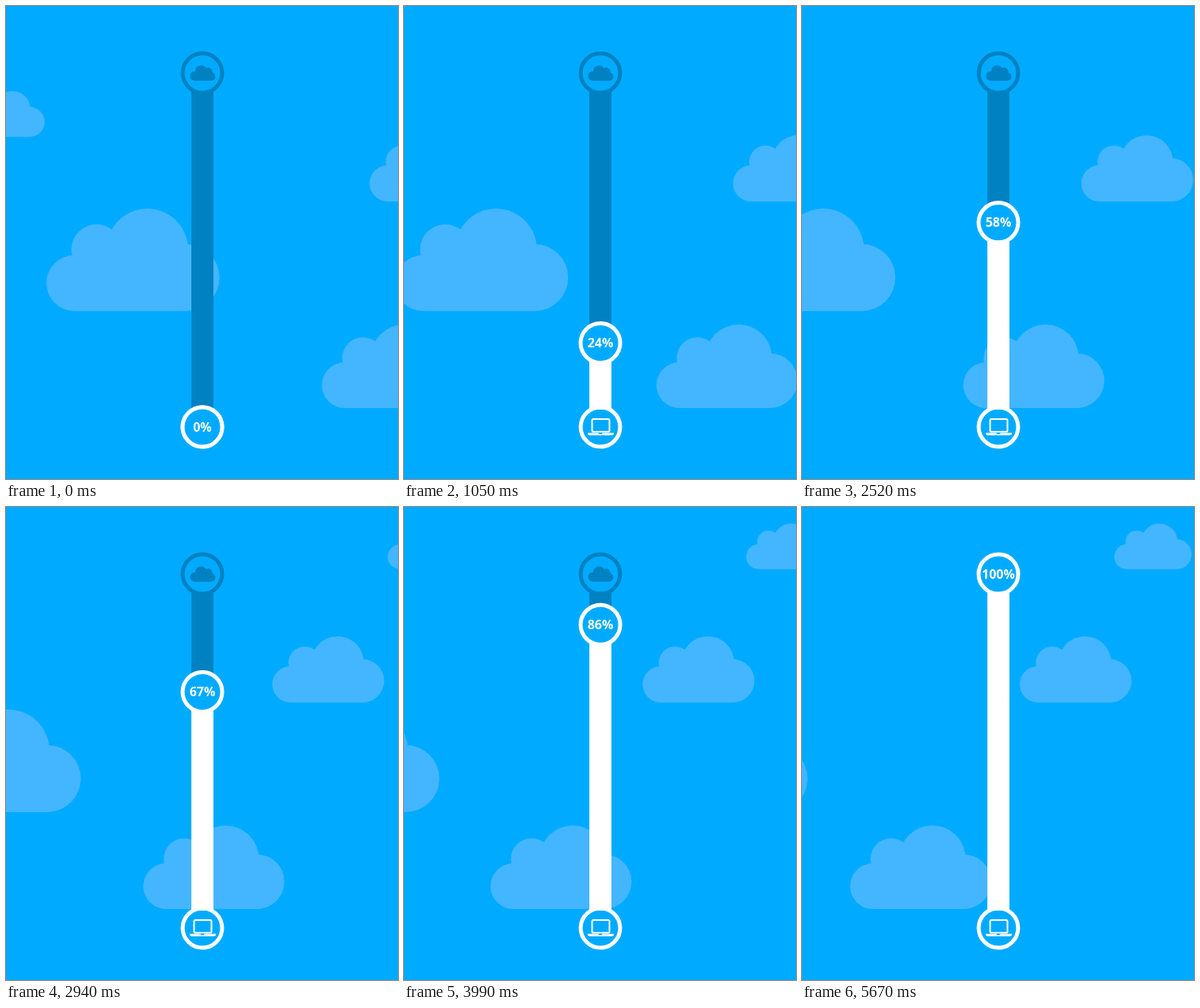
An HTML page that plays this animation: 497 px wide and 600 px high, repeating every 6.37 s.

```html
<!DOCTYPE html>
<html lang="en">
<head>
<meta charset="utf-8">
<title>Cloud upload</title>
<style>
  html, body { margin: 0; width: 100%; height: 100%; overflow: hidden; background: #00abff; }
  svg { display: block; width: 497px; height: 600px; }
  .cloud { fill: #44b6ff; }
  .dark { fill: #0081c2; }
  .ring { fill: #00abff; stroke: #fff; stroke-width: 5; }
  .ring.off { stroke: #0081c2; }
  text { font: 700 16px "Open Sans", "Noto Sans", sans-serif; fill: #fff; text-anchor: middle; }
</style>
</head>
<body>
<svg viewBox="0 0 497 600">
  <defs>
    <g id="cloud">
      <circle cx="35.5" cy="94.5" r="35.5"/>
      <circle cx="63.7" cy="52" r="32"/>
      <circle cx="128" cy="51.7" r="51.7"/>
      <circle cx="177" cy="87.5" r="42.5"/>
      <rect x="35.5" y="59" width="141.5" height="71"/>
    </g>
  </defs>
  <g id="sky"></g>

  <rect class="dark" x="235" y="107" width="28" height="405"/>
  <circle class="ring off" cx="249" cy="85" r="25"/>
  <g class="dark">
    <circle cx="239.3" cy="88.8" r="6"/>
    <circle cx="247.3" cy="82.5" r="7.3"/>
    <circle cx="256.3" cy="83.2" r="5.2"/>
    <circle cx="260" cy="89.4" r="5.4"/>
    <rect x="239.3" y="84" width="20.7" height="10.8"/>
  </g>

  <circle class="ring" cx="249" cy="534" r="25"/>
  <rect id="bar" x="235" width="28" fill="#fff"/>
  <rect x="238.5" y="524" width="22" height="16" rx="1.5" fill="none" stroke="#fff" stroke-width="2"/>
  <path d="M233 541.5H246.5Q247 543 248 543H250Q251 543 251.5 541.5H266V542.5Q266 544.5 263.5 544.5H235.5Q233 544.5 233 542.5Z" fill="#fff"/>

  <g id="knob">
    <circle class="ring" cx="249" r="25.1"/>
    <text id="label" x="249" y="5.5">0%</text>
  </g>
</svg>
<script>
const LOOP = 6370, STEP = 70, END = 5670, SPAN = 5740;
const BOTTOM = 534, TRAVEL = 449;

// start x, top y, scale, distance drifted left
const clouds = [
  [51.2, 257, 1, 263.7],
  [400.5, 404, 0.815, 339.5],
  [461, 164, 0.646, 185],
  [660, 21, 0.446, 264],
  [-49, 108, 0.446, 220]
];

const byId = id => document.getElementById(id);
const knob = byId('knob'), bar = byId('bar'), label = byId('label');

const shapes = clouds.map(() => {
  const use = document.createElementNS('http://www.w3.org/2000/svg', 'use');
  use.setAttribute('href', '#cloud');
  use.setAttribute('class', 'cloud');
  return byId('sky').appendChild(use);
});

// Brisk start, smooth stop
function ease(u) {
  const a = 1.22;
  return u * (a + u * (3 - 2 * a + u * (a - 2)));
}

function draw(ms) {
  const t = Math.min(Math.floor(ms / STEP) * STEP, END);
  const done = t === END;
  const p = done ? 1 : ease(t / SPAN);
  const y = BOTTOM - TRAVEL * p;

  knob.setAttribute('transform', `translate(0 ${y.toFixed(2)})`);
  bar.setAttribute('y', y);
  bar.setAttribute('height', Math.max(0, 512 - y));
  label.textContent = (done ? 100 : Math.min(99, Math.round(p * 100))) + '%';

  clouds.forEach(([x, top, scale, dist], i) => {
    shapes[i].setAttribute('transform', `translate(${(x - dist * p).toFixed(2)} ${top}) scale(${scale})`);
  });
}

const start = performance.now();
function tick() {
  draw((performance.now() - start) % LOOP);
  requestAnimationFrame(tick);
}
tick();
</script>
</body>
</html>
```
